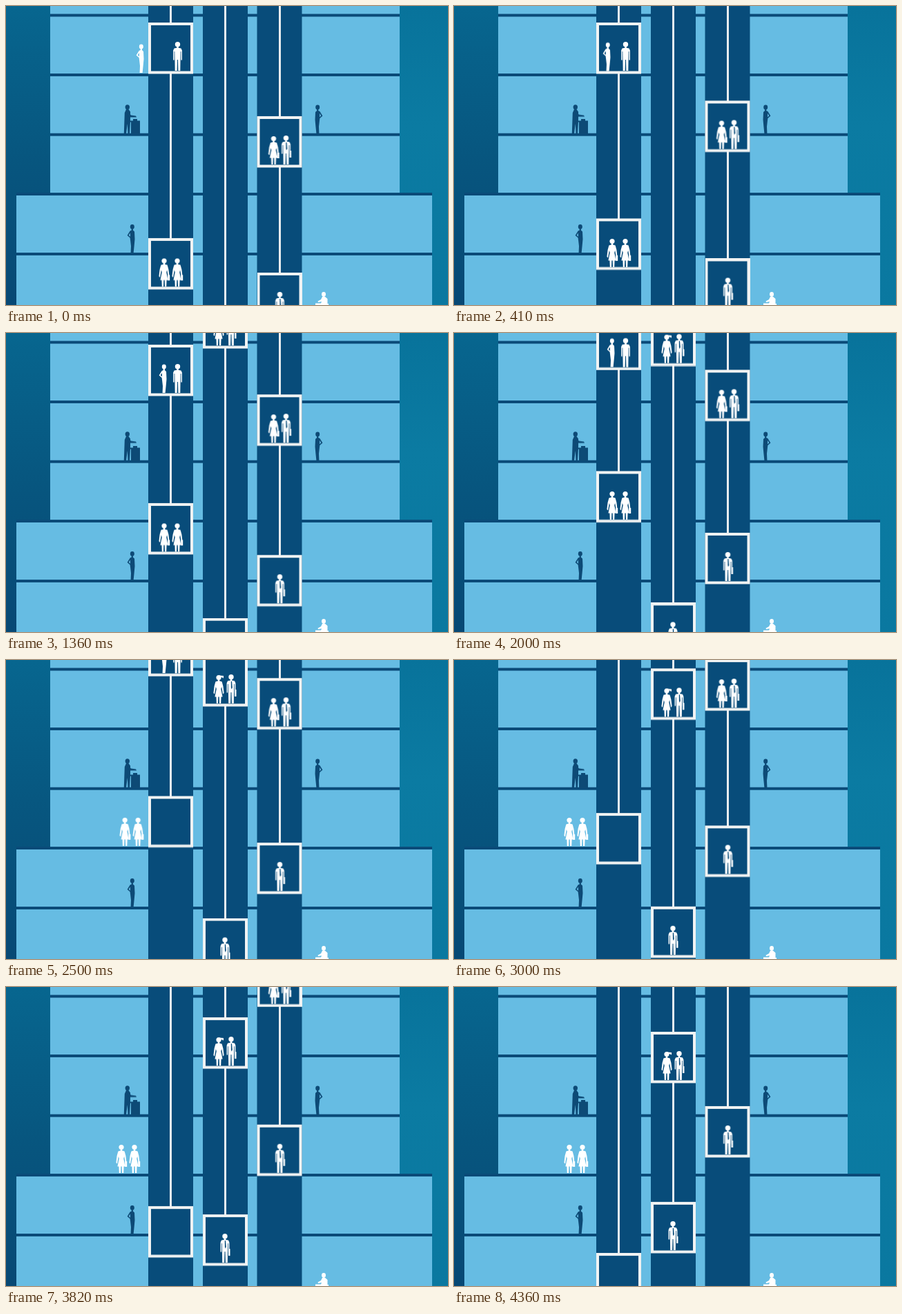
Recreate the animation shown at these times as an HTML page. Size 640 by 434 pixels, loop 4400 ms.

```html
<!DOCTYPE html>
<html lang="en">
<head>
<meta charset="utf-8">
<title>Elevators</title>
<style>
  html, body { margin: 0; width: 100%; height: 100%; overflow: hidden; background: #07547f; }
  svg { display: block; width: 100vw; height: 100vh; }
</style>
</head>
<body>
<svg id="stage" viewBox="0 0 640 434" preserveAspectRatio="none">
  <defs>
    <linearGradient id="leftSky" x1="0" y1="0" x2="0" y2="1">
      <stop offset="0" stop-color="#07668f"/>
      <stop offset=".5" stop-color="#07567f"/>
      <stop offset="1" stop-color="#074874"/>
    </linearGradient>
    <linearGradient id="rightSky" x1="0" y1="0" x2="0" y2="1">
      <stop offset="0" stop-color="#08739b"/>
      <stop offset=".4" stop-color="#0b7ba2"/>
      <stop offset="1" stop-color="#0a78a0"/>
    </linearGradient>

    <!-- Figures stand with their feet at 0,0 -->
    <g id="woman">
      <ellipse cy="-37.6" rx="3.6" ry="3.5"/>
      <path d="M-1.2-35H1.2V-32.5L4.6-31.5 6.4-25 7.6-15 6-13.5 4.2-24 3.2-21 5.6-9.5H-5.6L-3.2-21-4.2-24-6-13.5-7.6-15-6.4-25-4.6-31.5-1.2-32.5Z"/>
      <path d="M-3.6-10H-.7L-1 0H-3.2ZM.7-10H3.6L3.2 0H1Z"/>
    </g>
    <path id="bag" d="M5.2-17H8.2V-9H5.2Z"/>
    <path id="ponytail" d="M1-40.5 7-40 7-36.5 4-38 1-36.5Z"/>
    <g id="man">
      <ellipse cy="-38.3" rx="3.7" ry="3.6"/>
      <path d="M-1.3-36H1.3V-33.2L5-32.4 6.4-29.5V-15.5H4.9V-28H4.2L3.8 0H.9L.5-16H-.5L-.9 0H-3.8L-4.2-28H-4.9V-15.5H-6.4V-29.5L-5-32.4-1.3-33.2Z"/>
    </g>
    <g id="worker">
      <use href="#man"/>
      <path d="M5-20H7.5V-10H5Z"/>
      <path d="M-.2-32H1L1.8-23 .7-20.5-.1-23Z" fill="#084c7a"/>
    </g>
    <g id="waiter">
      <ellipse cx=".8" cy="-38" rx="3" ry="3.4"/>
      <path d="M-.3-35H1.9V-33L4-31 4.5-20 3.6-10 2.6 0H-1.4L-1-10-2-19-2.4-22-6.4-25.5-2.4-32-.3-33ZM-2.2-29-4.4-25.8-2-23.8Z" fill-rule="evenodd"/>
    </g>
  </defs>

  <rect width="320" height="434" fill="url(#leftSky)"/>
  <rect x="320" width="320" height="434" fill="url(#rightSky)"/>
  <g fill="#66bce3">
    <rect x="64" width="506" height="273"/>
    <rect x="15" y="273" width="602" height="161"/>
  </g>
  <g id="floors" fill="#0a4a78"></g>

  <g fill="#0d4a76">
    <use href="#waiter" x="182" y="358.5"/>
    <use href="#waiter" transform="translate(452 185) scale(-1 1)"/>
    <ellipse cx="175.8" cy="146.7" rx="3.2" ry="3.5"/>
    <path d="M174 150H177.5L180 153.5 180 168 179 185H176.5L175.8 171 174 185H170.8L171.8 155Z"/>
    <path id="arm" d="M177 153 181 157.5 188 158.5 189 160.5 180 160.5 176 158Z"/>
    <path d="M179.5 166.5H194V186H181V168.5H179.5Z"/>
    <path d="M184 164H190V167H184Z"/>
  </g>
  <g fill="#fff">
    <ellipse cx="460" cy="418.5" rx="3" ry="3.4"/>
    <path d="M458 422H462L465.5 425V432H467V434H448V431.5H456L457 429 452 430 451.5 428.5 456 426Z"/>
  </g>

  <g id="shafts" fill="#084c7a"></g>
  <g id="ropes" fill="#e9edef"></g>
  <g id="cars"></g>
  <g id="walkers" fill="#fff"></g>
</svg>

<script>
const LOOP = 4400;
const START = 'cubic-bezier(.33,0,.67,.33)';
const STOP = 'cubic-bezier(.33,.67,.67,1)';
const WALK = 'ease-in-out';
const byId = id => document.getElementById(id);

function add(parent, tag, attrs = {}) {
  const el = document.createElementNS('http://www.w3.org/2000/svg', tag);
  for (const key in attrs) el.setAttribute(key, attrs[key]);
  return parent.appendChild(el);
}

function addRect(parent, x, y, width, height) {
  return add(parent, 'rect', { x, y, width, height });
}

// Steps are [time, x, y, easing towards the next step]
function move(el, steps) {
  el.animate(steps.map(([t, x, y, easing = 'linear']) => ({
    offset: t / LOOP, transform: `translate(${x}px, ${y}px)`, easing
  })), { duration: LOOP, iterations: Infinity });
}

function addPeople(parent, people) {
  for (const [kind, x, y] of people) add(parent, 'use', { href: '#' + kind, x, y });
}

// Steps are [time, top, easing]; people are [kind, x] inside the car
function addCar(x, steps, people) {
  const ropeX = Math.round(x + 31);
  move(addRect(byId('ropes'), 0, -700, 3, 702),
    steps.map(([t, y, easing]) => [t, ropeX, y, easing]));
  const car = add(byId('cars'), 'g', { fill: '#fff' });
  add(car, 'rect', { x: 2, y: 2, width: 61, height: 70.5,
    fill: '#084c7a', stroke: '#f1f3f3', 'stroke-width': 4 });
  addPeople(car, people.map(([kind, px]) => [kind, px, 70]));
  move(car, steps.map(([t, y, easing]) => [t, x, y, easing]));
  return car;
}

for (const y of [13.5, 100, 186.7, 273, 360]) {
  const wide = y > 270;
  addRect(byId('floors'), wide ? 15 : 64, y - 2, wide ? 602 : 506, 4);
}
for (const x of [206, 285, 363.5]) addRect(byId('shafts'), x, 0, 65, 434);

const leftLow = [
  [0, 337], [820, 280], [1360, 247], [2000, 200.5, STOP], [2110, 197.5],
  [2600, 197.5, START], [3000, 222], [3820, 318], [4360, 386], [LOOP, 391]
];
addCar(206, leftLow, []);
const leftHigh = addCar(206,
  [[0, 24], [1110, 24, START], [1360, 17], [2000, -20.5], [2950, -78], [LOOP, -78]],
  [['man', 42.5]]);
addCar(285, [[0, 457], [820, 430], [1360, 413.7], [2000, 391.5], [LOOP, 310.6]],
  [['worker', 32]]);
addCar(285, [[0, -101.3], [820, -70], [1360, -52], [2000, -26.5], [LOOP, 66.5]],
  [['woman', 23], ['ponytail', 23], ['worker', 41]]);
addCar(363.5, [[0, 387], [820, 346], [1360, 322.3], [2000, 290], [LOOP, 171]],
  [['worker', 33]]);
addCar(363.5, [[0, 160], [820, 115], [1360, 89.3], [2000, 53.5], [LOOP, -77]],
  [['woman', 24], ['bag', 24], ['worker', 42]]);

// One passenger boards on the left, a pair gets off below
const boarder = add(leftHigh, 'use', { href: '#waiter' });
move(boarder, [[0, -11, 73], [60, -11, 73, WALK], [560, 22, 70], [LOOP, 22, 70]]);

const pair = add(byId('walkers'), 'g');
addPeople(pair, [['woman', 0, 0], ['woman', 19, 0], ['bag', 0, 0], ['bag', 19, 0]]);
move(pair, [
  ...leftLow.slice(0, 4).map(([t, y, easing]) => [t, 229, y + 70.5, easing]),
  [2110, 229, 268, WALK], [2600, 167, 270], [LOOP, 167, 270]
]);

move(byId('arm'), [[0, 0, 1, WALK], [550, 0, 0, WALK], [1650, 0, -1, WALK],
  [2750, 0, 0, WALK], [3600, 0, -1, WALK], [LOOP, 0, 1]]);
</script>
</body>
</html>
```
